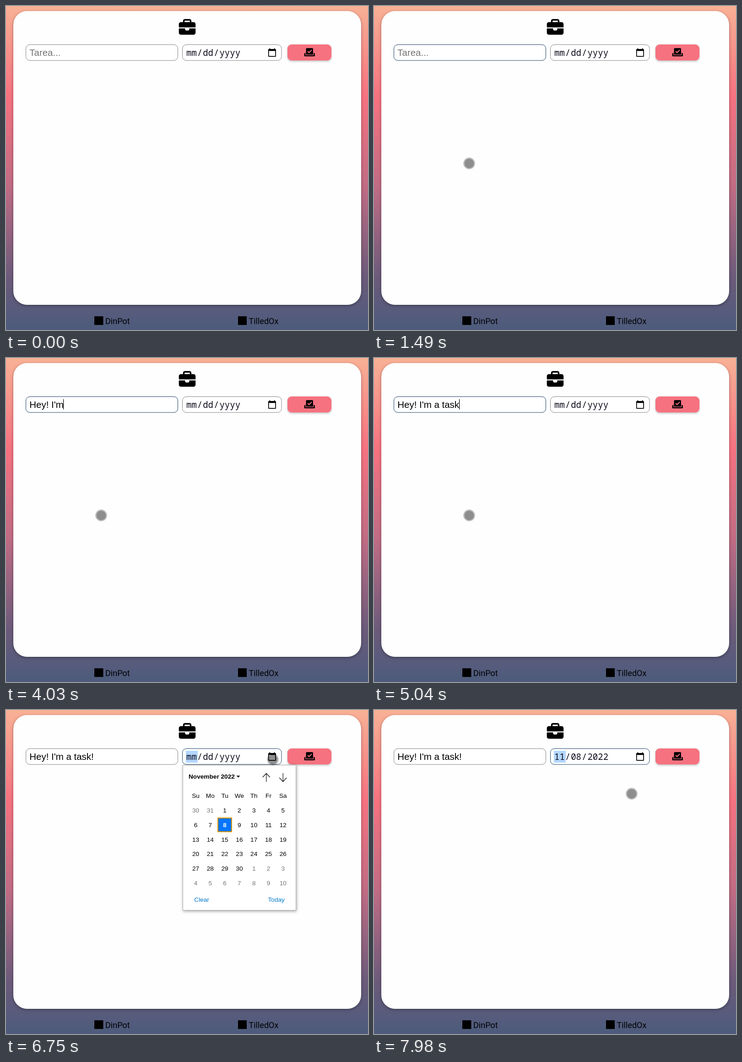
An HTML page that plays this animation: 791 px wide and 708 px high, repeating every 8 s.

```html
<!DOCTYPE html>
<html lang="es">
<head>
<meta charset="utf-8">
<title>Tareas</title>
<style>
  html, body { margin: 0; height: 100%; overflow: hidden; }
  svg { display: block; width: 791px; height: 708px; }
  text { white-space: pre; }
  .card { fill: #fefefe; filter: drop-shadow(0 2px 3px rgba(0,0,0,.35)); }
  .field { fill: #fff; stroke: #858585; }
  .field.on { stroke: #1f4468; }
  .button { fill: #f67280; filter: drop-shadow(0 2px 2px rgba(0,0,0,.25)); }
  .input { font: 20.48px "Liberation Sans", Arial, sans-serif; }
  .date { font: 19px "Noto Sans Mono", monospace; fill: #0c0c1c; }
  .link { font: 18px Roboto, sans-serif; }
  #popup { font: 13.65px "Liberation Sans", Arial, sans-serif; }
  #popup .panel { fill: #fff; stroke: #b0b0b0; filter: drop-shadow(1px 2px 3px rgba(0,0,0,.35)); }
  #popup .mid { text-anchor: middle; }
  #popup .dim { fill: #757575; }
  #popup .bold { font-weight: bold; }
  #popup .action { fill: #0078c8; }
</style>
</head>
<body>
<svg viewBox="0 0 791 708">
  <defs>
    <linearGradient id="sky" gradientUnits="userSpaceOnUse" x1="0" y1="0" x2="0" y2="790">
      <stop offset="0" stop-color="#f8b195"/>
      <stop offset=".25" stop-color="#f67280"/>
      <stop offset=".5" stop-color="#c06c84"/>
      <stop offset=".75" stop-color="#6c5b7b"/>
      <stop offset="1" stop-color="#355c7d"/>
    </linearGradient>
  </defs>
  <rect width="791" height="708" fill="url(#sky)"/>
  <rect class="card" x="16" y="11" width="760" height="642" rx="30"/>

  <!-- briefcase -->
  <path transform="translate(377.7 28.5) scale(.0713)" d="M184 48H328c4.4 0 8 3.6 8 8V96H176V56c0-4.4 3.6-8 8-8zm-56 8V96H64C28.7 96 0 124.7 0 160v96H512V160c0-35.3-28.7-64-64-64H384V56c0-30.9-25.1-56-56-56H184c-30.9 0-56 25.1-56 56zM512 288H320v32c0 17.7-14.3 32-32 32H224c-17.7 0-32-14.3-32-32V288H0V416c0 35.3 28.7 64 64 64H448c35.3 0 64-28.7 64-64V288z"/>

  <rect id="taskField" class="field" x="43.5" y="84.5" width="332" height="34.5" rx="8.5"/>
  <text id="task" class="input" x="51.3" y="108.7"></text>
  <rect id="caret" y="90" width="1.2" height="22.5"/>

  <rect id="dateField" class="field" x="385.5" y="84.5" width="216.5" height="34.5" rx="8.5"/>
  <rect id="mark" x="393" y="89" width="26" height="26" fill="#b3d7ff"/>
  <text class="date" x="394" y="109"><tspan id="month"></tspan><tspan dx="1">/</tspan><tspan id="day" dx="1"></tspan><tspan dx="1">/</tspan><tspan id="year" dx="1"></tspan></text>
  <path transform="translate(571.2 91.4) scale(.854)" d="M20 3h-1V1h-2v2H7V1H5v2H4c-1.1 0-2 .9-2 2v16c0 1.1.9 2 2 2h16c1.1 0 2-.9 2-2V5c0-1.1-.9-2-2-2zm0 18H4V8h16v13z"/>

  <!-- submit button -->
  <rect class="button" x="615" y="84" width="96" height="35" rx="9"/>
  <path transform="translate(651.7 90.8) scale(.0402)" d="M96 80c0-26.5 21.5-48 48-48H432c26.5 0 48 21.5 48 48V384H96V80zm313 47c-9.4-9.4-24.6-9.4-33.9 0l-111 111-47-47c-9.4-9.4-24.6-9.4-33.9 0s-9.4 24.6 0 33.9l64 64c9.4 9.4 24.6 9.4 33.9 0L409 161c9.4-9.4 9.4-24.6 0-33.9zM0 336c0-26.5 21.5-48 48-48H64V416H512V288h16c26.5 0 48 21.5 48 48v96c0 26.5-21.5 48-48 48H48c-26.5 0-48-21.5-48-48V336z"/>

  <rect x="193" y="678" width="19.5" height="19"/>
  <text class="link" x="217" y="695">DinPot</text>
  <rect x="507" y="678" width="19" height="19"/>
  <text class="link" x="530.5" y="695">TilledOx</text>

  <g id="popup">
    <rect class="panel" x="386.5" y="120.5" width="247" height="317"/>
    <text class="bold" x="399" y="150">November 2022</text>
    <path d="M503.5 143.5h8l-4 4z"/>
    <path d="M568.8 157V139m-8 8l8-8.5 8 8.5M605.3 138v18m-8-8l8 8.5 8-8.5" fill="none" stroke="#111" stroke-width="1.2"/>
    <rect x="463" y="236" width="30" height="30" fill="#0075ff" stroke="#e59700" stroke-width="2"/>
    <g id="days"></g>
    <text class="action" x="411.3" y="418.7">Clear</text>
    <text class="action" x="572.5" y="418.7">Today</text>
  </g>

  <g id="pointer">
    <circle r="10.5" fill="#000" fill-opacity=".44"/>
    <circle r="11.7" fill="none" stroke="#000" stroke-opacity=".24" stroke-width="2.4"/>
  </g>
</svg>
<script>
const $ = id => document.getElementById(id);
const LOOP = 8000, PHRASE = "Hey! I'm a task!";
const keyTimes = [1890, 2030, 2160, 2300, 2500, 3290, 3700, 4030, 4230, 4430, 4500, 4700, 4770, 4840, 5040, 5180];
const FOCUS = 790, PICK = 6540, OPEN = 6610, CHOOSE = 7490;

// pointer stops: time, x, y
const stops = [
  [130, 751, 693], [370, 400, 318], [610, 178, 92], [690, 177, 90], [960, 177, 90],
  [1220, 210, 340], [1290, 208, 344], [5590, 208, 344], [5790, 273, 286], [5900, 273, 286],
  [5990, 312, 251], [6440, 583, 108], [6950, 583, 108], [7290, 479, 253],
  [7770, 479, 253], [7980, 563, 183]
];

function addDay(label, col, row, style) {
  const el = document.createElementNS("http://www.w3.org/2000/svg", "text");
  el.setAttribute("x", 414.5 + col * 31.8);
  el.setAttribute("y", 191.8 + row * 31.9);
  el.setAttribute("class", "mid " + style);
  el.textContent = label;
  $("days").append(el);
}
["Su", "Mo", "Tu", "We", "Th", "Fr", "Sa"].forEach((name, i) => addDay(name, i, 0, ""));
for (let i = 0; i < 42; i++) {
  const date = new Date(2022, 9, 30 + i), n = date.getDate(), inside = date.getMonth() === 10;
  addDay(n, i % 7, 1 + Math.floor(i / 7), !inside ? "dim" : n === 8 ? "bold" : "");
}
$("days").children[16].setAttribute("fill", "#fff");

const clamp = v => Math.max(0, Math.min(1, v));

function pointerAt(t) {
  const next = stops.findIndex(s => s[0] > t);
  if (next < 0) return stops[stops.length - 1].slice(1);
  const [t0, x0, y0] = stops[Math.max(0, next - 1)], [t1, x1, y1] = stops[next];
  const k = t1 > t0 ? clamp((t - t0) / (t1 - t0)) : 0;
  return [x0 + (x1 - x0) * k, y0 + (y1 - y0) * k];
}

const show = (id, on) => $(id).setAttribute("visibility", on ? "visible" : "hidden");

function draw(t) {
  const typed = keyTimes.filter(k => k <= t).length;
  const typing = t >= FOCUS && t < PICK;
  const task = $("task");
  task.textContent = typed ? PHRASE.slice(0, typed) : "Tarea...";
  task.setAttribute("fill", typed ? "#000" : "#757575");
  const width = typed ? task.getComputedTextLength() : 0;
  const lastKey = typed ? keyTimes[typed - 1] : FOCUS;
  $("caret").setAttribute("x", Math.floor(51.3 + width));
  show("caret", typing && (t - lastKey) % 1000 < 500);
  $("taskField").classList.toggle("on", typing);

  const chosen = t >= CHOOSE;
  $("dateField").classList.toggle("on", t >= PICK);
  show("mark", t >= PICK);
  $("month").textContent = chosen ? "11" : "mm";
  $("day").textContent = chosen ? "08" : "dd";
  $("year").textContent = chosen ? "2022" : "yyyy";
  $("popup").setAttribute("opacity", clamp((t - OPEN) / 100) * clamp((CHOOSE + 190 - t) / 150));

  show("pointer", t >= 130);
  $("pointer").setAttribute("transform", `translate(${pointerAt(t)})`);
}

function tick() {
  draw(performance.now() % LOOP);
  requestAnimationFrame(tick);
}
tick();
</script>
</body>
</html>
```
